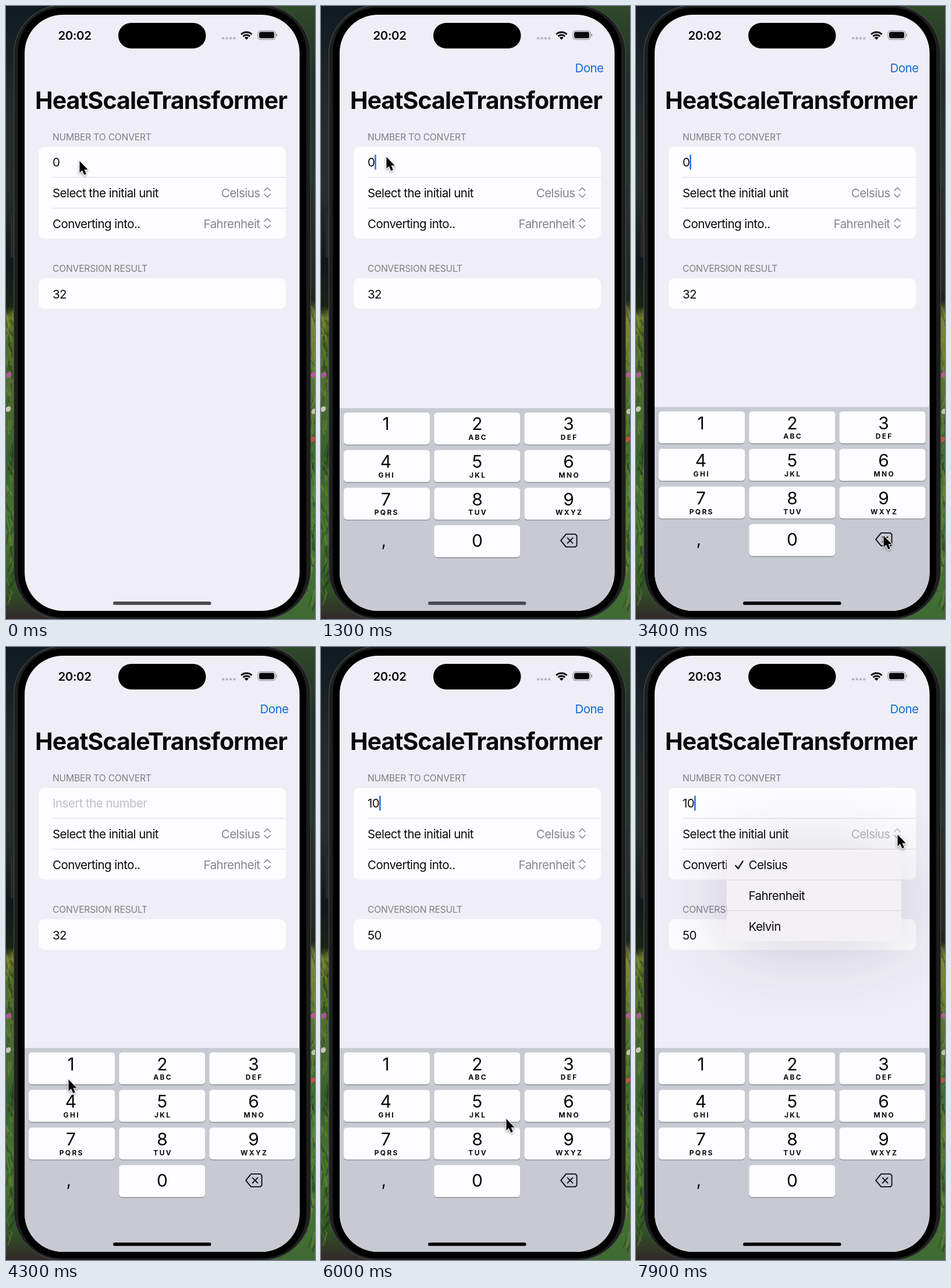
These frames come from a looping animation (531x1054 px, 8000 ms). An HTML page with a canvas:

```html
<!DOCTYPE html>
<html lang="en">
<head>
<meta charset="utf-8">
<title>Unit converter demo</title>
<style>
  html, body { margin: 0; width: 100%; height: 100%; overflow: hidden; background: #000; }
  canvas { display: block; }
</style>
</head>
<body>
<canvas id="stage" width="531" height="1054"></canvas>
<script>
const c = document.getElementById('stage').getContext('2d');
const LOOP = 8000, STEP = 100;
const INK = '#09090b', GRAY = '#86858b', BLUE = '#1769d8';

const clamp = v => Math.max(0, Math.min(1, v));
const ease = k => k * k * (3 - 2 * k);
// Critically damped spring: 0 before the start, then settles at 1.
const spring = (ms, w) => ms <= 0 ? 0 : 1 - (1 + w * ms / 1000) * Math.exp(-w * ms / 1000);

// time, x, y
const PATH = [
  [0, 126, 266], [700, 112, 259], [1400, 112, 259], [2200, 124, 709], [2600, 124, 709],
  [3200, 425, 910], [3650, 425, 910], [4300, 107, 743], [4450, 108, 741], [4750, 285, 903],
  [5400, 285, 903], [5700, 297, 880], [5800, 297, 880], [6700, 463, 331], [7000, 456, 328],
  [7500, 449, 322], [LOOP, 449, 322]
];
// time, field, result
const VALUES = [
  [0, '0', '32'], [2600, '01', '33.8'], [3300, '0', '32'], [3600, '', '32'],
  [4500, '1', '33.8'], [4800, '10', '50']
];
// key, down, up
const PRESSES = [['1', 2400, 2600], ['del', 3200, 3300], ['del', 3500, 3600], ['1', 4400, 4500], ['0', 4700, 4800]];
const KEYS = [['1', ''], ['2', 'ABC'], ['3', 'DEF'], ['4', 'GHI'], ['5', 'JKL'], ['6', 'MNO'],
  ['7', 'PQRS'], ['8', 'TUV'], ['9', 'WXYZ'], [',', ''], ['0', ''], ['del', '']];
const TAP = 900, MENU = 7620, MINUTE = 6200;

function box(x, y, w, h, r, fill) {
  c.beginPath();
  c.roundRect(x, y, w, h, r);
  c.fillStyle = fill;
  c.fill();
}

function text(s, x, y, { size = 20.5, weight = 400, color = INK, gap = -0.55, align = 'left' } = {}) {
  c.font = `${weight} ${size}px Inter, sans-serif`;
  c.letterSpacing = gap + 'px';
  c.textAlign = align;
  c.fillStyle = color;
  c.fillText(s, x, y);
}

function line(points, width, color) {
  c.beginPath();
  points.forEach(([x, y]) => c.lineTo(x, y));
  c.lineWidth = width;
  c.strokeStyle = color;
  c.lineCap = c.lineJoin = 'round';
  c.stroke();
}

function strip(x, w, stops) {
  const g = c.createLinearGradient(0, 0, 0, 1054);
  stops.forEach(([at, color]) => g.addColorStop(at, color));
  c.fillStyle = g;
  c.fillRect(x, 0, w, 1054);
}

function wallpaper() {
  strip(0, 265, [[0, '#0f1a22'], [.17, '#222b2b'], [.3, '#262f2c'], [.42, '#10181a'], [.49, '#1a2414'],
    [.51, '#6f7d2a'], [.55, '#4d6a26'], [.6, '#52702f'], [.75, '#35602a'], [.85, '#4d7a30'], [.95, '#2f5524'], [1, '#33282a']]);
  strip(265, 266, [[0, '#2f4a2a'], [.12, '#1f2f28'], [.3, '#24382d'], [.48, '#20271c'],
    [.51, '#7d8a3c'], [.56, '#6a7f30'], [.7, '#3a6a2c'], [.8, '#4a8034'], [1, '#3f6a33']]);
  grass();
  for (const [x, y, color] of [[5, 634, '#b0559a'], [4, 693, '#c9c8b8'],
    [528, 634, '#b85a90'], [527, 745, '#c0504a'], [529, 697, '#bcc3a4']]) {
    c.beginPath();
    c.ellipse(x, y, 4, 5, .5, 0, 7);
    c.fillStyle = color;
    c.fill();
  }
}

// Painted meadow: seeded light and dark brush strokes beside the phone.
function grass() {
  let seed = 7;
  const rnd = () => (seed = seed * 16807 % 2147483647) / 2147483647;
  for (let i = 0; i < 160; i++) {
    const x = (i % 2 ? 517 : 0) + rnd() * 14, y = 510 + rnd() * 540, lean = rnd() * 16 - 8;
    line([[x, y], [x + lean, y - 8 - rnd() * 18]], 1 + rnd() * 3,
      rnd() < .5 ? 'rgba(18, 38, 18, .35)' : 'rgba(135, 160, 60, .3)');
  }
}

function phone() {
  for (const [y, h] of [[188, 40], [262, 60], [357, 75]]) box(8, y, 8, h, 2, '#292a2a');
  box(520, 310, 7, 180, 2, '#292a2a');
  box(13.5, -1.5, 510, 1056, 84, '#1d1e1e');
  c.strokeStyle = '#484949';
  c.lineWidth = 1.2;
  c.stroke();
  box(20.5, 3, 495.5, 1048, 76, '#000');
}

function statusBar(t) {
  box(193, 29, 150.5, 44, 22, '#000');
  text(t < MINUTE ? '20:02' : '20:03', 118, 57.5, { weight: 600, align: 'center', gap: -.4 });
  for (let i = 0; i < 4; i++) box(371 + i * 6.4, 53.2, 4.4, 4.4, 2.2, '#b6b5bc');
  c.lineCap = 'butt';
  c.strokeStyle = INK;
  for (const r of [13, 8.2]) {
    c.beginPath();
    c.arc(413.3, 58, r, -Math.PI * .75, -Math.PI * .25);
    c.lineWidth = 3;
    c.stroke();
  }
  c.beginPath();
  c.moveTo(413.3, 58);
  c.arc(413.3, 58, 5, -Math.PI * .75, -Math.PI * .25);
  c.fillStyle = INK;
  c.fill();
  c.beginPath();
  c.roundRect(433, 42.6, 30, 15, 4.6);
  c.lineWidth = 1.2;
  c.strokeStyle = '#98979d';
  c.stroke();
  box(435, 44.6, 26, 11, 3, INK);
  box(464.3, 47.5, 1.8, 5, 1, '#98979d');
}

function picker(unit, y, color) {
  text(unit, 436.5, y + 8, { color, align: 'right' });
  line([[444, y - 3.5], [449, y - 8.5], [454, y - 3.5]], 1.6, color);
  line([[444, y + 2.8], [449, y + 7.8], [454, y + 2.8]], 1.6, color);
}

function caret(t, x) {
  const lastEdit = Math.max(TAP, ...VALUES.map(v => v[0]).filter(at => at <= t));
  const phase = (t - lastEdit) % 1000;
  c.globalAlpha = phase < 620 ? 1 : clamp((690 - phase) / 70);
  box(x, 255.5, 2.4, 26, 1.2, BLUE);
  c.globalAlpha = 1;
}

function form(t, menu) {
  const [, field, result] = VALUES.findLast(v => v[0] <= t);
  const header = { size: 15.65, color: '#7f7e85', gap: -.2 };
  text('HeatScaleTransformer', 50, 177, { size: 41, weight: 700, gap: -.92 });
  text('NUMBER TO CONVERT', 80, 230.7, header);
  box(56, 242, 425, 158, 10, '#fdfcfe');
  for (const y of [294, 347]) box(80, y, 401, 1, 0, '#dbdadf');
  if (field) text(field, 80, 276);
  else text('Insert the number', 80, 276, { color: '#c0bfc4' });
  if (t >= TAP) caret(t, 80 + (field ? c.measureText(field).width : 0));
  text('Select the initial unit', 80, 329);
  picker('Celsius', 321, menu > .2 ? '#b7b6ba' : GRAY);
  text('Converting into..', 80, 382);
  picker('Fahrenheit', 374, GRAY);
  text('CONVERSION RESULT', 80, 457, header);
  box(56, 468, 425, 52.5, 10, '#fdfcfe');
  text(result, 80, 502.5);
  c.globalAlpha = clamp((t - TAP) / 300);
  text('Done', 436.5, 114, { color: BLUE });
  c.globalAlpha = 1;
}

function backspace(x, y, pressed) {
  const outline = [[-14, 0], [-5, -11], [11, -11], [13.5, -8.5], [13.5, 8.5], [11, 11], [-5, 11], [-14, 0]];
  line(outline.map(([a, b]) => [x + a, y + b]), 1.8, INK);
  if (pressed) {
    c.fillStyle = INK;
    c.fill();
  }
  for (const s of [-1, 1]) line([[x - 2.5, y - 4.5 * s], [x + 6.5, y + 4.5 * s]], 1.8, pressed ? '#fff' : INK);
}

function keyboard(t) {
  const shown = spring(t - TAP, 18.26);
  if (!shown) return;
  c.save();
  c.translate(0, 352 * (1 - shown));
  box(32, 689.5, 473, 360, 0, '#c8cad3');
  KEYS.forEach(([label, letters], i) => {
    const col = i % 3, x = 39 + col * 155.2, y = 697 + Math.floor(i / 3) * 64.6;
    const mid = 111.5 + col * 157;
    const pressed = PRESSES.some(([key, down, up]) => key === label && t >= down && t < up);
    if (label === 'del') return backspace(mid + .6, y + 26.3, pressed);
    if (label === ',') return text(',', mid - 3.5, y + 36, { size: 29, align: 'center', gap: 0 });
    box(x, y + 1.4, 148, 55, 5.5, '#8b8d93');
    box(x, y, 148, 55, 5.5, pressed ? '#abb7c9' : '#fdfcfe');
    text(label, mid, y + (label === '0' ? 37.5 : 30.5), { size: 30, align: 'center', gap: 0 });
    text(letters, mid + 1.2, y + 47.3, { size: 12, weight: 700, align: 'center', gap: 2.3 });
  });
  c.restore();
}

function unitMenu(open) {
  if (!open) return;
  c.save();
  c.translate(449, 348);
  c.scale(open, open);
  c.translate(-449, -348);
  c.globalAlpha = clamp(open * 1.5);
  c.shadowColor = 'rgba(40, 38, 60, .2)';
  c.shadowBlur = 130;
  c.shadowOffsetY = 8;
  box(155, 348, 301, 158, 14, '#f3f1f5');
  c.shadowColor = 'transparent';
  for (const y of [400, 453]) box(155, y, 301, 1, 0, '#d6d4da');
  ['Celsius', 'Fahrenheit', 'Kelvin'].forEach((unit, i) => text(unit, 193, 382 + i * 53));
  line([[170.5, 376], [175, 381], [183, 368.5]], 2.3, INK);
  c.restore();
}

function pointer(t) {
  const i = PATH.findLastIndex(p => p[0] <= t);
  const [t0, x0, y0] = PATH[i], [t1, x1, y1] = PATH[i + 1];
  const k = ease((t - t0) / (t1 - t0));
  c.save();
  c.translate(x0 + (x1 - x0) * k + .5, y0 + (y1 - y0) * k + .5);
  c.scale(.93, .93);
  const arrow = new Path2D('M0 0V21.5L4.8 17.2L8.4 25.6L12.2 24L8.7 15.8H15.2Z');
  c.shadowColor = 'rgba(0, 0, 0, .4)';
  c.shadowBlur = 4;
  c.shadowOffsetY = 2;
  c.lineJoin = 'round';
  c.lineWidth = 2.4;
  c.strokeStyle = '#fff';
  c.stroke(arrow);
  c.shadowColor = 'transparent';
  c.fillStyle = '#000';
  c.fill(arrow);
  c.restore();
}

function draw(t) {
  const menu = spring(t - MENU, 30);
  wallpaper();
  phone();
  c.save();
  box(32, 15, 472.5, 1025, 66, '#efeef6');
  c.clip();
  statusBar(t);
  form(t, menu);
  keyboard(t);
  unitMenu(menu);
  box(184, 1024, 168.5, 5.8, 2.9, t < 2700 ? '#4a494f' : '#000');
  c.restore();
  pointer(t);
}

const start = performance.now();
function tick() {
  const t = (performance.now() - start) % LOOP;
  draw(Math.floor(t / STEP) * STEP);
  requestAnimationFrame(tick);
}
tick();
</script>
</body>
</html>
```
